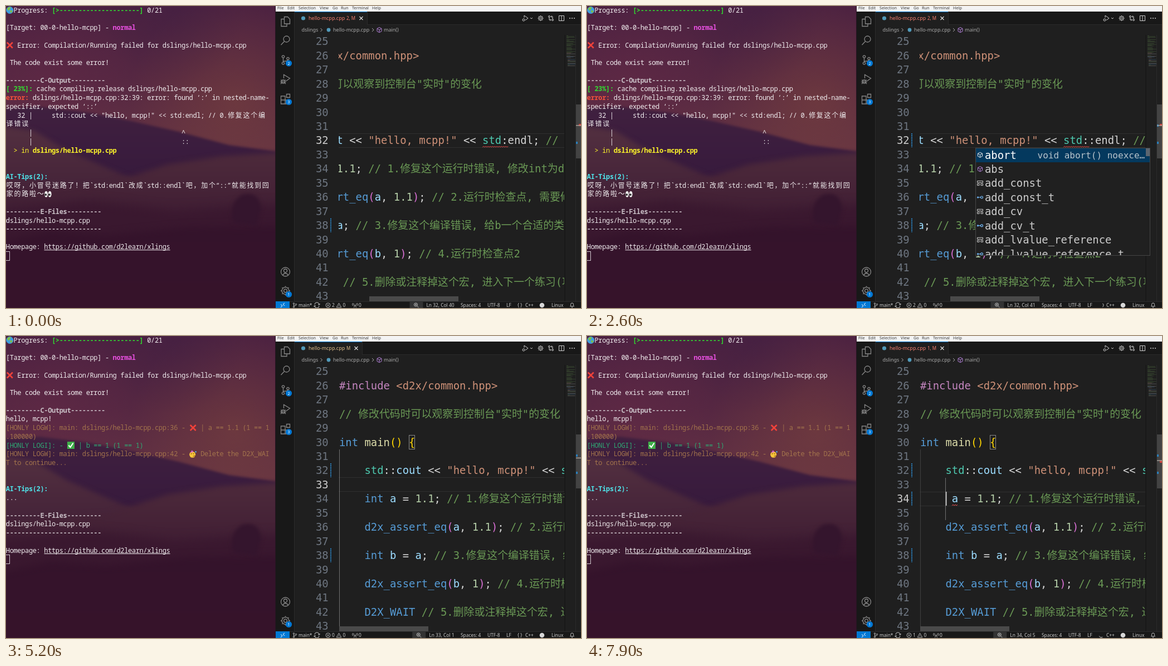
An HTML page with a canvas for the animation above (8 s loop, 1032 by 543 pixels).

```html
<!DOCTYPE html>
<html lang="zh">
<head>
<meta charset="utf-8">
<style>
html, body { margin: 0; width: 100%; height: 100%; overflow: hidden; background: #1f1f1f }
canvas { display: block }
</style>
</head>
<body>
<canvas id="stage" width="1032" height="543"></canvas>
<script>
const g = stage.getContext('2d');
const LOOP = 8000;
const UI = '"Noto Sans", "Open Sans", sans-serif';
const CODE = '"DejaVu Sans Mono", "Noto Sans CJK SC", "Noto Sans CJK", monospace';
const TERM = '"Noto Sans Mono", "Noto Sans CJK SC", "Noto Sans CJK", monospace';
const GREY = '#cccccc', DIM = '#868686', BLUE = '#0078d4';

function rect(x, y, w, h, color) { g.fillStyle = color; g.fillRect(x, y, w, h); }
function frame(x, y, w, h, color) { g.strokeStyle = color; g.lineWidth = 1; g.strokeRect(x, y, w, h); }
function dot(x, y, r, color) { g.fillStyle = color; g.beginPath(); g.arc(x, y, r, 0, 7); g.fill(); }
function text(s, x, y, color, font, align = 'left') {
  g.font = font; g.fillStyle = color; g.textAlign = align;
  g.fillText(s, x, y);
}
const ui = (s, x, y, color = GREY, size = 8.4, align) => text(s, x, y, color, `${size}px ${UI}`, align);
function icon(d, x, y, color = GREY, width = 1, fill = false) {
  const p = new Path2D(d);
  g.save(); g.translate(x, y);
  g.strokeStyle = g.fillStyle = color; g.lineWidth = width;
  fill ? g.fill(p) : g.stroke(p);
  g.restore();
}
const ring = (x, y, r) => `M${x + r} ${y}a${r} ${r} 0 1 1 ${-2 * r} 0a${r} ${r} 0 1 1 ${2 * r} 0`;
function gear(r) {
  let d = ring(0, 0, r * .35) + ring(0, 0, r * .75);
  for (let i = 0; i < 8; i++) {
    const c = Math.cos(i * Math.PI / 4), s = Math.sin(i * Math.PI / 4);
    d += `M${c * r * .75} ${s * r * .75}L${c * r} ${s * r}`;
  }
  return d;
}
// true inside any of the listed [start, end) pairs
function during(t, ...p) {
  for (let i = 0; i < p.length; i += 2) if (t >= p[i] && t < p[i + 1]) return true;
  return false;
}

// ---------- terminal ----------
const CELL = 6.85, ROW = 15.75;
const WHITE = '#f0ecee', GREEN = '#2fe02f', RED = '#f0503c', YELLOW = '#fbf32a', CYAN = '#4fe3ea',
  BROWN = '#a2734c', LOG = '#2fa873', RULE = '#c9bfc6';
const CROSS = 'M-5 -5L5 5M5 -5L-5 5';
const emoji = {
  '🌏'(x, y) {
    dot(x, y, 6.5, '#3f9ee0');
    icon('M-5 -3Q-2 -7 2 -5L0 -1L-3 1zM1 0L5 1L3 5L0 3z', x, y, '#7cc04a', 1, true);
  },
  '❌'(x, y) { icon(CROSS, x, y, '#f0423a', 2.6); },
  '✅'(x, y) {
    rect(x - 6.5, y - 6.5, 13, 13, '#3fae49');
    icon('M-4 0L-1 3.5L4 -4', x, y, '#fff', 2);
  },
  '🥳'(x, y) {
    dot(x - 1, y + 1, 5.5, '#f9c53a');
    icon('M-5 -2L-2 -7L1 -4z', x, y, '#d764c8', 1, true);
    icon('M-4 0l2 -1M0 -1l2 1M0 4l5 -1', x, y, '#7a4a1a', 1.2);
    dot(x + 5, y - 4, 1.2, '#52b6ea');
  },
  '👀'(x, y) {
    for (const k of [-3.3, 3.3]) {
      g.fillStyle = '#f4f4f4'; g.beginPath(); g.ellipse(x + k, y, 2.9, 5.5, 0, 0, 7); g.fill();
      dot(x + k - .8, y + 1, 1.9, '#333');
    }
  }
};
function term(row, col, s, color = WHITE, bold = false) {
  const y = 7.5 + row * ROW;
  g.font = `${bold ? 'bold ' : ''}12px ${TERM}`;
  g.textAlign = 'center';
  for (const ch of s) {
    const wide = ch in emoji || /[\u2e80-\uffef]/.test(ch) ? 2 : 1;
    const x = (col + wide / 2) * CELL;
    if (ch in emoji) emoji[ch](x, y);
    else { g.fillStyle = color; g.fillText(ch, x, y + 4.2); }
    col += wide;
  }
}

const photo = document.createElement('canvas');
photo.width = 484; photo.height = 543;
(function paintPhoto() {
  const c = photo.getContext('2d');
  const fade = (x0, y0, x1, y1, ...stops) => {
    const f = c.createLinearGradient(x0, y0, x1, y1);
    stops.forEach((s, i) => f.addColorStop(i / (stops.length - 1), s));
    return f;
  };
  const glow = (x, y, r, color) => {
    const f = c.createRadialGradient(x, y, 0, x, y, r);
    f.addColorStop(0, color); f.addColorStop(1, color.slice(0, 7) + '00');
    c.fillStyle = f; c.fillRect(0, 0, 484, 543);
  };
  const land = (points, fill, blur) => {
    c.filter = `blur(${blur}px)`; c.fillStyle = fill;
    c.fill(new Path2D(`M-30 570L-30 ${points}L520 570z`));
    c.filter = 'none';
  };
  c.fillStyle = fade(0, 0, 0, 260, '#4b2141', '#552742', '#643343');
  c.fillRect(0, 0, 484, 543);
  glow(80, 130, 160, '#64294680');
  glow(410, 170, 190, '#7a423c90');
  glow(300, 10, 130, '#42204280');
  land('186L60 181L150 192L230 208L310 226L400 250L520 266', fade(0, 185, 0, 310, '#40203f', '#371a3d'), 2);
  land('212L50 224L110 260L165 284L260 325L520 400', fade(0, 215, 0, 360, '#533040', '#412037'), 4);
  land('335L180 320L290 285L390 270L520 262', fade(0, 265, 0, 400, '#4d2a3b', '#3d1b32'), 5);
  land('370L150 350L300 368L520 355', '#3a182f', 9);
  land('430L80 405L180 412L320 398L520 395', fade(0, 400, 0, 543, '#34132b', '#36132a'), 7);
  c.filter = 'blur(3px)'; c.fillStyle = '#34152d';
  c.fill(new Path2D('M408 390Q398 352 425 339Q455 332 458 365L450 395z'));
  c.filter = 'none';
})();

function drawTerminal(t) {
  const shown = !during(t, 600, 1200, 1800, 2400, 3400, 3800, 4400, 5000, 5600, 6200, 6800, 7400);
  const built = t >= 3600;
  g.drawImage(photo, 0, 0);
  term(0, 0, '🌏Progress:');
  term(0, 12, '[>' + '-'.repeat(21) + ']', GREEN, true);
  term(0, 37, '0/21');
  term(2, 0, '[Target: 00-0-hello-mcpp] -');
  if (shown) term(2, 28, 'normal', '#e850e0', true);
  term(4, 0, '❌ Error: Compilation/Running failed for dslings/hello-mcpp.cpp');
  term(6, 1, 'The code exist some error!');
  const bar = '-'.repeat(9);
  term(8, 0, bar + 'C-Output' + bar, RULE, true);
  let tips = 19;
  if (built) {
    tips = 17;
    term(9, 0, 'hello, mcpp!');
    term(10, 0, '[HONLY LOGW]: main: dslings/hello-mcpp.cpp:36 - ❌ | a == 1.1 (1 == 1', BROWN);
    term(11, 0, '.100000)', BROWN);
    term(12, 0, '[HONLY LOGI]: - ✅ | b == 1 (1 == 1)', LOG);
    term(13, 0, '[HONLY LOGW]: main: dslings/hello-mcpp.cpp:42 - 🥳 Delete the D2X_WAI', BROWN);
    term(14, 0, 'T to continue...', BROWN);
    term(18, 0, '...');
  } else {
    term(9, 0, '[ 23%]:', GREEN, true);
    term(9, 8, 'cache compiling.release dslings/hello-mcpp.cpp');
    term(10, 0, 'error:', RED, true);
    term(10, 7, 'dslings/hello-mcpp.cpp:32:39: error: found ‘:’ in nested-name-');
    term(11, 0, 'specifier, expected ‘::’');
    term(12, 3, '32 |     std::cout << "hello, mcpp!" << std:endl; // 0.修复这个编');
    term(13, 0, '译错误');
    term(14, 6, '|'); term(14, 46, '^');
    term(15, 6, '|'); term(15, 46, '::');
    term(16, 2, '> in', YELLOW);
    term(16, 7, 'dslings/hello-mcpp.cpp', YELLOW, true);
    term(20, 0, '哎呀，小冒号迷路了！把`std:endl`改成`std::endl`吧，加个“::”就能找到回');
    term(21, 0, '家的路啦～👀');
  }
  if (shown) term(tips, 0, 'AI-Tips(2):', CYAN, true);
  const end = built ? 20 : 23;
  term(end, 0, bar + 'E-Files' + bar, RULE, true);
  term(end + 1, 0, 'dslings/hello-mcpp.cpp');
  term(end + 2, 0, '-'.repeat(25), RULE, true);
  term(end + 4, 0, 'Homepage: https://github.com/d2learn/xlings');
  const y = 7.5 + (end + 4) * ROW;
  rect(10 * CELL, y + 5.5, 33 * CELL, 1, WHITE);
  frame(-.5, Math.round(y + ROW) - 7.5, 7, 16, '#cfc6cc');
}

// ---------- editor ----------
const LEFT = 598, SIZE = 18.9, CHAR = 11.38, LINE = 25.44;
const mid = n => 63.5 + (n - 25) * LINE;
const KEY = '#569cd6', TYPE = '#4ec9b0', VAR = '#9cdcfe', FN = '#dcdcaa', STR = '#ce9178', NUM = '#b5cea8',
  OP = '#d4d4d4', NOTE = '#6a9955', GOLD = '#ffd700', PINK = '#da70d6', ERR = '#f14c4c';
const code = (s, x, y, color, size = SIZE) => text(s, x, y + size * .365, color, `${size}px ${CODE}`);

function sourceLines(s) {
  const check = (name, value, note) =>
    ['    d2x_assert_eq', KEY, '(', PINK, name, VAR, ', ', OP, value, NUM, ')', PINK, '; ', OP, note, NOTE];
  return {
    26: ['#include ', '#c586c0', '<d2x/common.hpp>', STR],
    28: ['// 修改代码时可以观察到控制台"实时"的变化', NOTE],
    30: ['int ', KEY, 'main', FN, '() {', GOLD],
    32: ['    std', TYPE, '::', OP, 'cout', VAR, ' << ', OP, '"hello, mcpp!"', STR, ' << ', OP, 'std', TYPE,
      s.typed ? '::' : ':', OP, 'endl', s.errors ? OP : FN, '; ', OP, '// 0.修复这个编译错误', NOTE],
    34: [s.cut ? '    ' : '    int', KEY, ' a', VAR, ' = ', OP, '1.1', NUM, '; ', OP,
      '// 1.修复这个运行时错误, 修改int为double', NOTE],
    36: check('a', '1.1', '// 2.运行时检查点, 需要修复代码'),
    38: ['    int', KEY, ' b', VAR, ' = ', OP, 'a', VAR, '; ', OP, '// 3.修复这个编译错误, 给b一个合适的类型', NOTE],
    40: check('b', '1', '// 4.运行时检查点2'),
    42: ['    D2X_WAIT ', KEY, '// 5.删除或注释掉这个宏, 进入下一个练习(项目)', NOTE]
  };
}

function state(t) {
  const s = {
    typed: t >= 2000, cut: t >= 6900, selected: during(t, 6100, 6900),
    errors: t < 3700 ? 2 : t < 7700 ? 0 : 1,
    scroll: t < 4500 ? 141 : 0,
    line: t < 4500 ? 32 : t < 6000 ? 33 : 34,
    caret: during(t, 600, 1000, 1600, 2500, 3400, 4400, 4500, 5000, 5500, 6100, 6900, 7400, 7600, 8000),
    loading: during(t, 2100, 3800, 4700, 5200, 6900, 8000)
  };
  const back = Math.min(10, Math.floor((t - 3300) / 100 * 1.25));
  s.col = t < 2000 ? 40 : t < 3400 ? 41 : t < 4500 ? 41 - back : t < 6000 ? 1 : t < 6100 ? 6 : t < 6900 ? 8 : 5;
  return s;
}

function squiggle(x, y, w) {
  let d = 'M0 0';
  for (let i = 2; i <= w; i += 2) d += `L${i} ${i % 4 ? -2 : 0}`;
  icon(d, x, y + 1, ERR);
}

function drawPopup() {
  const x = 697.5, y = 255.5;
  rect(x, y, 313, 193, '#202020');
  rect(x, y, 313, 25.5, '#04395e');
  g.save();
  g.beginPath(); g.rect(x, y, 313, 193); g.clip();
  ['abort', 'abs', 'add_const', 'add_const_t', 'add_cv', 'add_cv_t', 'add_lvalue_reference',
    'add_lvalue_reference_t'].forEach((name, i) => {
    const row = 267.7 + i * LINE;
    code(name, 714, row, i ? GREY : '#fff');
    if (i < 2) icon('M0 -4.5L4 -2.5V2.5L0 4.5L-4 2.5V-2.5zM-4 -2.5L0 0L4 -2.5M0 0V4.5', 705.5, row, i ? '#b180d7' : '#e8e8e8');
    else if (i % 2 == 0) icon('M-5 -4h10v3h-10zM-5 1h3.5v3h-3.5zM1.5 1h3.5v3h-3.5z', 705.5, row, GREY);
    else icon(ring(3, 0, 2) + ring(-4, 0, 1) + 'M-3 0H1', 705.5, row, '#75beff', 1.2);
  });
  code('void abort() noexce…', 808.5, 267.7, '#b9c4cc', 16);
  g.restore();
  rect(1003, 256, 7, 14, '#5c6670');
  frame(x, y, 313, 193, '#454545');
}

function drawCode(t, s) {
  const x0 = LEFT - s.scroll, lines = sourceLines(s);
  const at = col => x0 + (col - 1) * CHAR;
  const word = 3 * CHAR;
  rect(518, 52, 514, 479, '#1f1f1f');
  for (let n = 25; n <= 43; n++) code(n, 556, mid(n), n == s.line ? GREY : '#6e7681');
  g.save();
  g.beginPath(); g.rect(582, 52, 421, 479); g.clip();
  g.strokeStyle = '#2a7fbd'; g.lineWidth = 2; g.setLineDash([2, 1]);
  for (const n of [38, t >= 2300 && 32, t >= 7100 && 34]) if (n) {
    g.beginPath(); g.moveTo(583, mid(n) - 12.5); g.lineTo(583, mid(n) + 12.5); g.stroke();
  }
  g.setLineDash([]);
  g.beginPath(); g.rect(597, 52, 406, 479); g.clip();
  if (!s.selected) for (const k of [-12.7, 12.2]) rect(597, Math.round(mid(s.line) + k), 406, 1, '#303030');
  if (!s.scroll) rect(598, 204, 1, 327, s.cut ? '#404040' : '#707070');
  if (s.cut) rect(643, 255, 1, 76, '#707070');
  if (s.selected) rect(at(5), mid(34) - 12.7, word, LINE, t < 6300 ? '#264f78' : '#3b5175');
  if (during(t, 6300, 6900)) for (const [col, n] of [[1, 30], [5, 38]]) rect(at(col), mid(n) - 12.7, word, LINE, '#38393b');
  if (!s.scroll && !s.selected) frame(723.5, mid(30) - 12.2, 10, 25, '#888888');
  for (const n in lines) {
    let x = x0;
    for (let i = 0; i < lines[n].length; i += 2) {
      code(lines[n][i], x, mid(n), lines[n][i + 1]);
      x += g.measureText(lines[n][i]).width;
    }
  }
  if (s.errors == 2) squiggle(at(36), 253, 46);
  if (s.errors == 1) squiggle(655, 304, 11);
  if (s.caret) rect(Math.round(at(s.col)), Math.round(mid(s.line) - 12.5), 1.5, 25, '#d0d0d0');
  if (during(t, 6600, 6900)) {
    icon('M-1 -5L.5 -1.5L4 0L.5 1.5L-1 5L-2.5 1.5L-6 0L-2.5 -1.5z', 603, 285, '#ffcc33', 1, true);
    icon('M0 -3L1 -1L3 0L1 1L0 3L-1 1L-3 0L-1 -1z', 606, 289, '#ffcc33', 1, true);
  }
  g.restore();
  rect(s.scroll ? 652 : 598, 522, 160, 9, '#4a4a4a');

  // minimap and ruler
  rect(1002, 52, 2, 479, '#191919');
  g.globalAlpha = .3;
  for (let k = 0; k < 40; k++) {
    if (k % 5 == 4) continue;
    const w = 3 + 13 * Math.abs(Math.sin(k * 7.3));
    rect(1006 + (k > 27 ? 2 : 0), 53 + k * 1.42, w, .9, k < 22 || k % 4 == 1 ? NOTE : [KEY, STR, OP][k % 3]);
  }
  g.globalAlpha = 1;
  rect(1022, 52, 1, 479, '#2b2b2b');
  rect(1023, 177, 9, 97, '#434343');
  rect(1023, 244, 3, 4, '#2a7fbd');
  if (t >= 2300) rect(1023, 213, 3, 4, '#2a7fbd');
  if (s.errors) rect(1028, s.errors == 2 ? 212 : 224, 4, 4, '#d0423c');
  rect(1023, 214 + (s.line - 32) * 4.6, 9, 1.5, '#a8a098');
  if (during(t, 2300, 3400)) drawPopup();
}

function drawChrome(t, s) {
  rect(484, 0, 548, 10, '#f4f4f4');
  [['File', 487], ['Edit', 505], ['Selection', 525], ['View', 563], ['Go', 586], ['Run', 601],
    ['Terminal', 621], ['Help', 657]].forEach(([w, x]) => ui(w, x, 5.6, '#3a3a3a', 7.3));

  // tab and breadcrumbs
  rect(484, 10, 548, 23, '#181818');
  const tone = s.errors ? '#f88070' : '#e2c08d', edge = s.errors ? 648 : 639;
  rect(518, 10, edge - 518, 24, '#1f1f1f');
  rect(518, 10, edge - 518, 1, BLUE);
  rect(edge, 10, 1, 23, '#2b2b2b');
  rect(edge, 33, 1032 - edge, 1, '#2b2b2b');
  dot(533.5, 22, 3.6, '#519aba');
  ui('hello-mcpp.cpp', 543, 25.2, tone, 9);
  ui(s.errors ? s.errors + ', M' : 'M', 611, 25.2, tone, 8);
  if (during(t, 2000, 2200)) dot(637.5, 22, 3.4, '#fff');
  else icon('M-3 -3L3 3M3 -3L-3 3', edge - 10.5, 22, '#e6e6e6', 1.1);
  icon('M-2 -1V-5L5 0L0 3.5' + ring(-3, 3, 2), 932, 22);
  icon('M-2 -1L0 1L2 -1', 943, 22);
  icon(gear(5), 959.5, 22);
  icon(ring(-3, -3, 1.5) + ring(3, 3, 1.5) + 'M-3 -1V3H0M3 1V-3H0M-1.5 1.5L0 3L-1.5 4.5M1.5 -4.5L0 -3L1.5 -1.5', 978, 22);
  icon('M-4.5 -4.5h9v9h-9zM0 -4.5v9', 997, 22);
  for (const x of [1012, 1016, 1020]) dot(x, 22, 1, GREY);
  rect(518, 34, 514, 18, '#1f1f1f');
  const faded = '#a9a9a9', chevron = 'M-1.5 -3L1.5 0L-1.5 3';
  ui('dslings', 530.5, 46.2, faded, 9);
  icon(chevron, 566, 43, faded);
  dot(579, 43, 3.4, '#519aba');
  ui('hello-mcpp.cpp', 587, 46.2, faded, 9);
  icon(chevron, 658.5, 43, faded);
  icon('M0 -4.5L4 -2.5V2.5L0 4.5L-4 2.5V-2.5zM-4 -2.5L0 0L4 -2.5M0 0V4.5', 670, 43, '#b180d7');
  ui('main()', 678, 46.2, faded, 9);

  // activity bar
  rect(484, 10, 34, 521, '#181818');
  rect(517, 10, 1, 521, '#2b2b2b');
  const side = (d, y) => icon(d, 501.5, y, DIM, 1.3);
  side('M-2 -8.5h6l4 4v8.5h-10zM-2 -4.5h-5.5v13h10v-4', 28);
  side(ring(2, -2.5, 5.5) + 'M-2 1.5L-8 8', 62);
  side(ring(-4, -6, 2.2) + ring(4.5, -2.5, 2.2) + ring(-4, 6, 2.2) + 'M-4 -4V4M4.5 0Q4 2.5 -4 2.5', 97);
  side('M-3 -2V-8.5L8 -2L1 3' + ring(-4, 4, 3) + 'M-8.5 1.5h9M-9 4.5h10M-8.5 8l2 -2M.5 8l-2 -2', 132);
  side('M-8 -5h7.5v7h7v7h-14.5zM-8 2h7.5v7M2 -8.5h6v6h-6z', 167);
  side(ring(0, 0, 8) + ring(0, -2, 3) + 'M-5 6Q0 -1 5 6', 478);
  side(gear(8.5), 512);
  for (const [n, y] of [[2, 103], [3, 172.5], [1, 518.5]]) {
    dot(507.5, y, 5.6, BLUE);
    ui(n, 507.5, y + 2.5, '#fff', 7, 'center');
  }

  // status bar
  rect(484, 531, 548, 12, '#181818');
  rect(484, 531, 548, 1, '#2b2b2b');
  rect(484, 531, 25, 12, BLUE);
  icon('M-3.5 -1.5L-.5 1L-3.5 4M3.5 -4L.5 -1.5L3.5 1', 496.5, 538, '#fff');
  const Y = 541;
  icon(ring(-2, -3, 1.2) + ring(-2, 3, 1.2) + ring(2, -1.5, 1.2) + 'M-2 -2V2M2 0Q2 1 -2 1', 518.5, 538, GREY, .8);
  ui('main*', 525, Y);
  icon('M-4 -1A4 4 0 0 1 4 -1M4 1A4 4 0 0 1 -4 1M2 -1H5V-3M-2 1H-5V3', 558, 538, GREY, .9);
  icon(ring(0, 0, 4) + 'M-1.7 -1.7L1.7 1.7M1.7 -1.7L-1.7 1.7', 578, 538, GREY, .8);
  ui(s.errors, 585, Y);
  icon('M0 -4L4.3 3.7H-4.3zM0 -1V1.5', 597.5, 538, GREY, .8);
  ui('0', 604.5, Y);
  icon('M0 -1L-2 4M0 -1L2 4M-2 -3.5Q-3.5 -1.5 -2 .5M2 -3.5Q3.5 -1.5 2 .5M-4 -4Q-6 -1.5 -4 1M4 -4Q6 -1.5 4 1', 626.5, 538, GREY, .8);
  ui('0', 633, Y);
  const place = `Ln ${s.line}, Col ${s.col}` + (s.selected ? ' (3 selected)' : '');
  ui(place, 804.5, Y, GREY, 8.4, 'right');
  const left = 804.5 - g.measureText(place).width;
  rect(left - 30, 532, 24, 11, '#333333');
  icon(ring(-1, -1, 3) + 'M1.2 1.2L4 4M-2.5 -1H.5M-1 -2.5V.5', left - 18, 538, GREY, .9);
  ui('Spaces: 4', 816, Y);
  ui('UTF-8', 864, Y);
  ui('LF', 898, Y);
  if (s.loading) {
    const now = during(t, 2600, 3400) ? 2600 : Math.floor(t / 100) * 100;
    const a = (now / 1000 - .6) * Math.PI * 2;
    g.strokeStyle = GREY; g.lineWidth = 1;
    g.beginPath(); g.arc(923, 538, 4, a - .9, a + .9); g.stroke();
  } else ui('{ }', 918, Y);
  ui('C++', 932, Y);
  dot(962, 538, 4.3, '#d8d8d8');
  ui('Linux', 979, Y);
  icon('M-3.5 2H3.5L2.5 .5V-1.5A2.5 2.5 0 0 0 -2.5 -1.5V.5zM-1 3.5H1', 1016, 538, GREY, .9);
}

function draw(now) {
  const t = now % LOOP, s = state(t);
  drawTerminal(t);
  rect(483, 0, 1, 543, '#2a1424');
  drawCode(t, s);
  drawChrome(t, s);
  requestAnimationFrame(draw);
}
requestAnimationFrame(draw);
</script>
</body>
</html>
```
